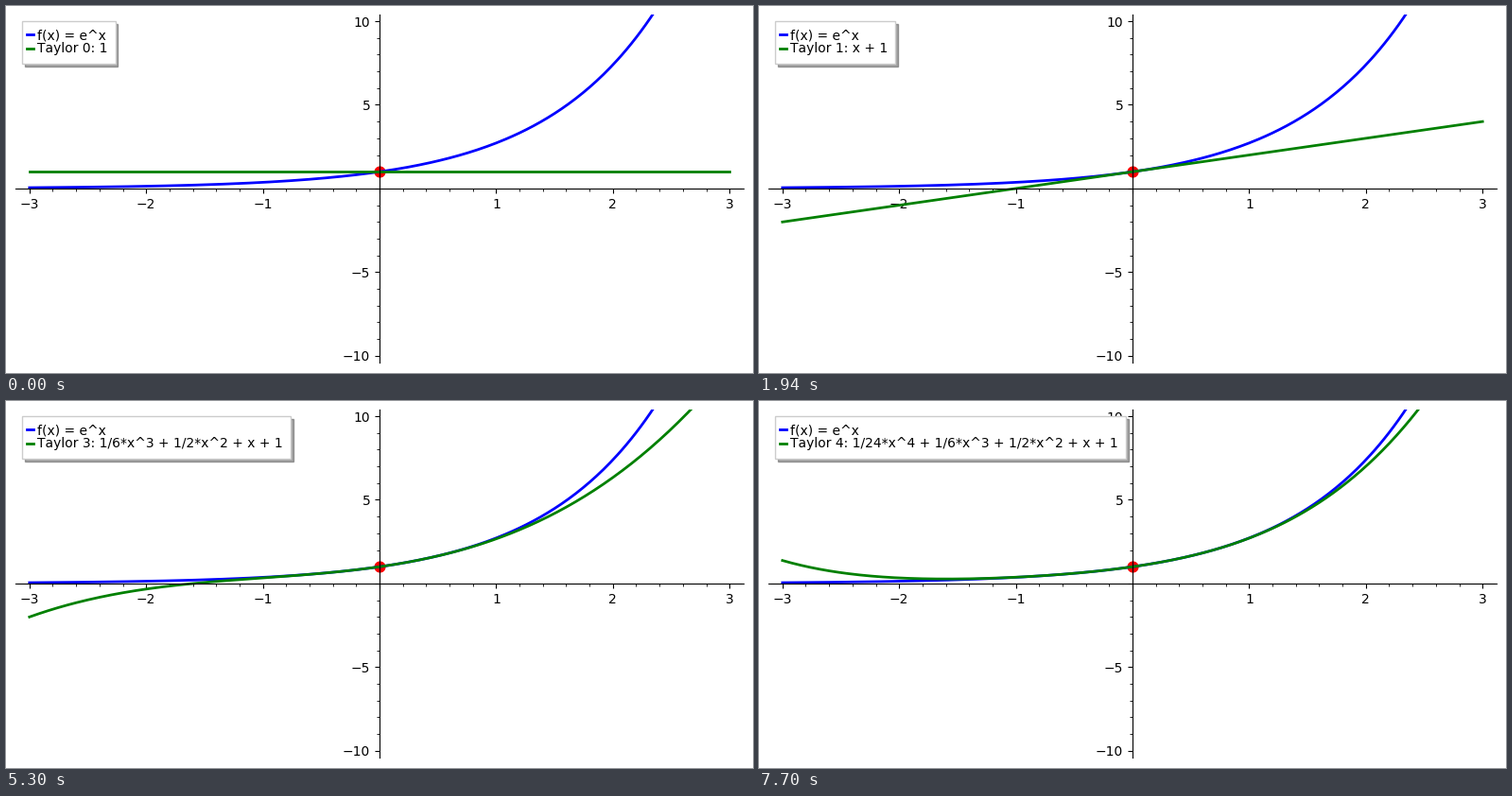
These frames come from a looping animation (790x388 px, 8 s). A matplotlib script:

```python
import math

import matplotlib.pyplot as plt
import numpy as np
from matplotlib.animation import FuncAnimation
from matplotlib.ticker import FuncFormatter, MultipleLocator

W, H, DPI = 790, 388, 100
INTERVAL = 100
FRAMES = 80
HOLD = 24          # frames per degree
LEAD = 19          # part of the first hold already elapsed

plt.rcParams["font.family"] = "DejaVu Sans"
plt.rcParams["font.size"] = 10
plt.rcParams["text.kerning_factor"] = 6    # whole-pixel kerning

fig = plt.figure(figsize=(W / DPI, H / DPI), dpi=DPI, facecolor="white")
ax = fig.add_axes([10 / W, 11.07 / H, 770 / W, 368 / H])
ax.set_xlim(-3.12, 3.12)
ax.set_ylim(-10.4, 10.4)


def tick_label(value, _pos):
    if abs(value) < 1e-9:
        return ""
    return f"{value:g}".replace("-", "\u2212")


def setup_axis(axis, major, minor):
    axis.set_major_locator(MultipleLocator(major))
    axis.set_minor_locator(MultipleLocator(minor))
    axis.set_major_formatter(FuncFormatter(tick_label))


setup_axis(ax.xaxis, 1, 0.2)
setup_axis(ax.yaxis, 5, 1)
for side in ("left", "bottom"):
    ax.spines[side].set_position("zero")
for side in ("right", "top"):
    ax.spines[side].set_visible(False)

x = np.linspace(-3, 3, 301)
ax.scatter([0], [1], s=60, color="red", zorder=1)
exp_line, = ax.plot(x, np.exp(x), color="blue", lw=2)
poly_line, = ax.plot(x, np.ones_like(x), color="green", lw=2)


def term(k):
    if k == 0:
        return "1"
    return "x" if k == 1 else f"1/{math.factorial(k)}*x^{k}"


def poly_text(degree):
    return " + ".join(term(k) for k in range(degree, -1, -1))


def draw(i):
    degree = (i + LEAD) // HOLD
    poly_line.set_ydata(sum(x**k / math.factorial(k) for k in range(degree + 1)))
    ax.legend(
        [exp_line, poly_line],
        ["f(x) = e^x", f"Taylor {degree}: {poly_text(degree)}"],
        loc="upper left", shadow=True, fancybox=False, edgecolor="0.8",
        numpoints=2, borderpad=0.6, handlelength=0.05, handletextpad=0.5,
        labelspacing=0.02,
    )
    return ()


anim = FuncAnimation(fig, draw, frames=FRAMES, interval=INTERVAL,
                     repeat=True, repeat_delay=0, blit=False)
plt.show()
```
